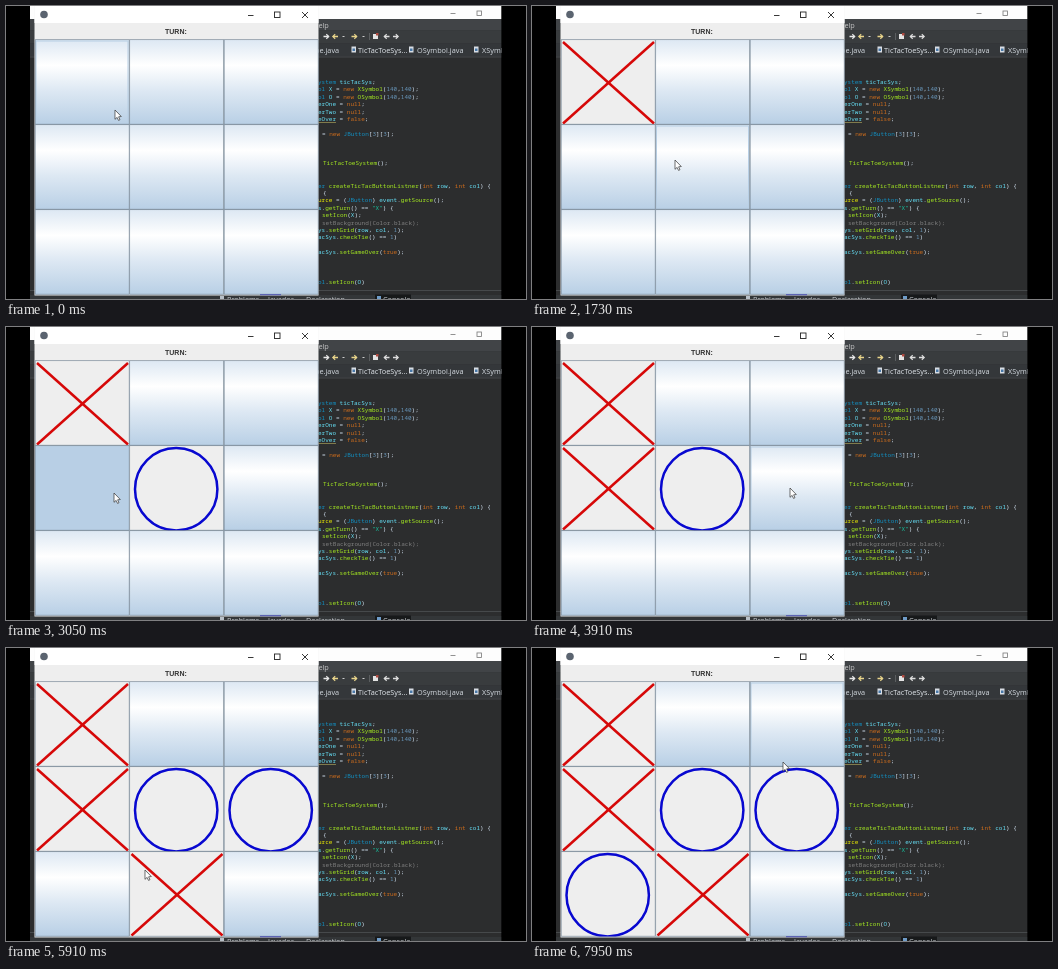
Animation of 520x293 px, one loop 8000 ms. Source, as an HTML page with a canvas:

```html
<!DOCTYPE html>
<html lang="en">
<head>
<meta charset="utf-8">
<title>Tic-tac-toe</title>
<style>
html, body { margin: 0; width: 100%; height: 100%; overflow: hidden; background: #000; }
canvas { display: block; width: 520px; height: 293px; }
</style>
</head>
<body>
<canvas id="stage" width="520" height="293"></canvas>
<script>
const ctx = document.getElementById('stage').getContext('2d');
const LOOP = 8000;
const MONO = '6px "Noto Sans Mono", "DejaVu Sans Mono", monospace';
const UI = '7.3px "Open Sans", "Noto Sans", sans-serif';
const COLS = [29, 123.5, 218], ROWS = [34, 119, 204];
const CELL_W = 94, CELL_H = 84.5;

const PALETTE = {
  k: '#cc6c1d', t: '#1290c3', m: '#a7ec21', v: '#66e1f8',
  y: '#f2f200', n: '#6897bb', s: '#17c6a3', c: '#808080', w: '#d9e8f7'
};

// Each line: x, baseline, then colour-keyed pieces.
const CODE = [
  [312, 78, 't:ystem', 'v: ticTacSys', 'w:;'],
  [312, 85.4, 't:ol', 'v: X', 'w: = ', 'k:new', 'm: XSymbol', 'w:(', 'n:140', 'w:,', 'n:140', 'w:);'],
  [312, 92.8, 't:ol', 'v: O', 'w: = ', 'k:new', 'm: OSymbol', 'w:(', 'n:140', 'w:,', 'n:140', 'w:);'],
  [312, 100.2, 'v:erOne', 'w: = ', 'k:null', 'w:;'],
  [312, 107.6, 'v:erTwo', 'w: = ', 'k:null', 'w:;'],
  [312, 115, 'v:eOver', 'w: = ', 'k:false', 'w:;'],
  [316, 129.8, 'w:= ', 'k:new', 't: JButton', 'w:[', 'n:3', 'w:][', 'n:3', 'w:];'],
  [317, 159.4, 'm:TicTacToeSystem', 'w:();'],
  [312, 181.6, 't:er', 'm: createTicTacButtonListner', 'w:(', 'k:int', 'v: row', 'w:, ', 'k:int', 'v: col', 'w:) {'],
  [317, 189, 'w:{'],
  [312, 196.4, 'y:urce', 'w: = (', 't:JButton', 'w:) ', 'v:event', 'w:.', 'm:getSource', 'w:();'],
  [312, 203.8, 'v:s', 'w:.', 'm:getTurn', 'w:() == ', 's:"X"', 'w:) {'],
  [316, 211.2, 'm:setIcon', 'w:(', 'v:X', 'w:);'],
  [316, 218.6, 'c:setBackground(Color.black);'],
  [312, 226, 'v:ys', 'w:.', 'm:setGrid', 'w:(', 'v:row', 'w:, ', 'v:col', 'w:, ', 'n:1', 'w:);'],
  [312, 233.4, 'v:acSys', 'w:.', 'm:checkTie', 'w:() == ', 'n:1', 'w:)'],
  [312, 248.2, 'v:acSys', 'w:.', 'm:setGameOver', 'w:(', 'k:true', 'w:);'],
  [312, 277.8, 't:ol', 'w:.', 'm:setIcon', 'w:(', 'v:O', 'w:)']
];

// Clicks: time of release, cell, mark.
const MOVES = [
  [620, 0, 'X'], [2150, 4, 'O'], [3130, 3, 'X'],
  [4330, 5, 'O'], [5560, 7, 'X'], [6850, 6, 'O']
];
const PRESS = 120;

// Pointer stops: time, x, y.
const PATH = [
  [0, 109, 104], [350, 99, 98], [1050, 99, 98], [1730, 143, 154],
  [1950, 158, 164], [2300, 158, 164], [2850, 108, 166], [3250, 108, 166],
  [3910, 258, 161], [4120, 265, 164], [4500, 265, 164], [5300, 150, 238],
  [5650, 150, 238], [5910, 139, 222], [6600, 78, 247], [7000, 78, 247],
  [7500, 180, 200], [7950, 251, 114], [8000, 251, 114]
];

function rect(x, y, w, h, color) {
  ctx.fillStyle = color;
  ctx.fillRect(x, y, w, h);
}

function line(points, color, width) {
  ctx.beginPath();
  points.forEach(([x, y]) => ctx.lineTo(x, y));
  ctx.strokeStyle = color;
  ctx.lineWidth = width;
  ctx.stroke();
}

function text(str, x, y, font, color) {
  ctx.font = font;
  ctx.fillStyle = color;
  ctx.fillText(str, x, y);
}

function drawCode() {
  for (const [x0, y, ...parts] of CODE) {
    let x = x0;
    for (const part of parts) {
      const str = part.slice(2);
      text(str, x, y, MONO, PALETTE[part[0]]);
      x += ctx.measureText(str).width;
    }
  }
  line([[312, 116.5], [330, 116.5]], '#b9b060', 0.6);
}

function arrow(x, color, dir) {
  line([[x - 2.5, 30.5], [x + 2.5, 30.5]], color, 1.5);
  line([[x + dir * 0.3, 28.2], [x + dir * 2.7, 30.5], [x + dir * 0.3, 32.8]], color, 1.2);
}

function fileIcon(x) {
  rect(x, 40.5, 4.5, 6, '#d8dde4');
  rect(x + 1, 42.5, 2.5, 2.5, '#4878a8');
}

function drawEditor() {
  rect(24, 0, 471.5, 293, '#2c2d2e');
  rect(24, 0, 471.5, 13, '#fdfdfd');
  line([[444.5, 7.5], [449.5, 7.5]], '#777', 0.8);
  ctx.strokeRect(471, 5, 4.5, 4.5);
  rect(24, 13, 471.5, 11.5, '#414447');
  rect(24, 24.5, 471.5, 13, '#393c3e');
  rect(24, 37.5, 471.5, 13, '#34373a');
  rect(24, 50.5, 471.5, 1, '#45484a');
  text('Help', 307, 21.5, UI, '#c8c8c8');

  arrow(320, '#e8e8e8', 1);
  arrow(329.5, '#e8d48a', -1);
  rect(336.5, 30, 2, 1, '#ccc');
  arrow(348, '#e8d48a', 1);
  rect(356.5, 30, 2, 1, '#ccc');
  rect(363, 27, 0.7, 7, '#6b6e70');
  rect(367, 28, 5, 5, '#e4e4e4');
  rect(370, 27, 2.5, 2.5, '#b04a40');
  arrow(381, '#dddddd', -1);
  arrow(389.5, '#dddddd', 1);

  text('pe.java', 309, 46.5, UI, '#d6dce2');
  fileIcon(345.5);
  text('TicTacToeSys...', 352, 46.5, UI, '#e4e9ee');
  fileIcon(403);
  text('OSymbol.java', 411, 46.5, UI, '#d6dce2');
  fileIcon(468);
  text('XSymbol', 476, 46.5, UI, '#d6dce2');
  drawCode();

  rect(24, 284, 471.5, 1, '#46494b');
  rect(24, 289, 471.5, 4, '#333638');
  rect(369, 288.5, 36, 5, '#17191a');
  [['Problems', 221], ['Javadoc', 262], ['Declaration', 300], ['Console', 377]]
    .forEach(([str, x]) => text(str, x, 296, UI, '#c8cdd2'));
  rect(214, 290, 4, 3, '#b8c0c8');
  rect(371, 290, 4, 3, '#6f9cc8');

  rect(0, 0, 24, 293, '#000');
  rect(495.5, 0, 24.5, 293, '#000');
}

function drawWindow() {
  rect(28.5, 0, 284, 289.5, '#eeeeee');
  rect(28.5, 0, 284, 17, '#ffffff');
  ctx.beginPath();
  ctx.arc(38, 8.5, 3.8, 0, Math.PI * 2);
  ctx.fillStyle = '#5b6470';
  ctx.fill();
  line([[242, 9.5], [247.5, 9.5]], '#222', 0.9);
  ctx.strokeRect(268.5, 6, 5.5, 5.5);
  line([[296, 6], [302, 12]], '#222', 0.9);
  line([[302, 6], [296, 12]], '#222', 0.9);
  text('TURN:', 159, 28, 'bold 7px "Liberation Sans", Arial, sans-serif', '#333333');
}

function drawMark(mark, x, y) {
  if (mark === 'X') {
    line([[x + 2, y + 2], [x + 93, y + 83.5]], '#d60808', 2.5);
    line([[x + 93, y + 2], [x + 2, y + 83.5]], '#d60808', 2.5);
  } else {
    ctx.beginPath();
    ctx.arc(x + 46.7, y + 43.2, 41.2, 0, Math.PI * 2);
    ctx.strokeStyle = '#0808d0';
    ctx.lineWidth = 2.5;
    ctx.stroke();
  }
}

function buttonFill(y) {
  const g = ctx.createLinearGradient(0, y, 0, y + CELL_H);
  g.addColorStop(0, '#dde8f3');
  g.addColorStop(0.3, '#ffffff');
  g.addColorStop(0.6, '#dde8f3');
  g.addColorStop(1, '#b8cfe5');
  return g;
}

function drawCell(i, t, px, py) {
  const x = COLS[i % 3], y = ROWS[Math.floor(i / 3)];
  const move = MOVES.find(m => m[1] === i);
  const marked = move && t >= move[0];
  const pressed = move && !marked && t >= move[0] - PRESS;
  const hover = px >= x && px < x + CELL_W && py >= y && py < y + CELL_H;
  rect(x, y, CELL_W, CELL_H, marked ? '#eeeeee' : pressed ? '#b8cfe5' : buttonFill(y));
  if (hover && !marked && !pressed) {
    ctx.strokeStyle = '#b8cfe5';
    ctx.lineWidth = 1;
    ctx.strokeRect(x + 1, y + 1, CELL_W - 2, CELL_H - 2);
  }
  ctx.strokeStyle = '#7a8a99';
  ctx.lineWidth = 0.7;
  ctx.strokeRect(x + 0.2, y - 0.3, CELL_W, CELL_H);
  if (marked) {
    ctx.save();
    ctx.beginPath();
    ctx.rect(x, y, CELL_W, CELL_H);
    ctx.clip();
    drawMark(move[2], x, y);
    ctx.restore();
  }
}

function pointerAt(t) {
  const i = Math.max(1, PATH.findIndex(p => p[0] > t));
  const [t0, x0, y0] = PATH[i - 1], [t1, x1, y1] = PATH[i];
  const u = (t - t0) / (t1 - t0), e = u * u * (3 - 2 * u);
  return [x0 + (x1 - x0) * e, y0 + (y1 - y0) * e];
}

function drawPointer(x, y) {
  ctx.beginPath();
  [[0, 0], [0, 9.3], [2.1, 7.4], [3.5, 10.4], [5, 9.7], [3.6, 6.8], [6.3, 6.5]]
    .forEach(([dx, dy]) => ctx.lineTo(x + dx, y + dy));
  ctx.closePath();
  ctx.fillStyle = '#fff';
  ctx.fill();
  ctx.strokeStyle = '#333';
  ctx.lineWidth = 0.7;
  ctx.stroke();
}

function draw(t) {
  drawEditor();
  drawWindow();
  const [px, py] = pointerAt(t);
  for (let i = 0; i < 9; i++) drawCell(i, t, px, py);
  rect(254, 288, 21, 1.3, '#5c64b4');
  drawPointer(px, py);
}

const start = performance.now();
function tick() {
  draw((performance.now() - start) % LOOP);
  requestAnimationFrame(tick);
}
tick();
</script>
</body>
</html>
```
